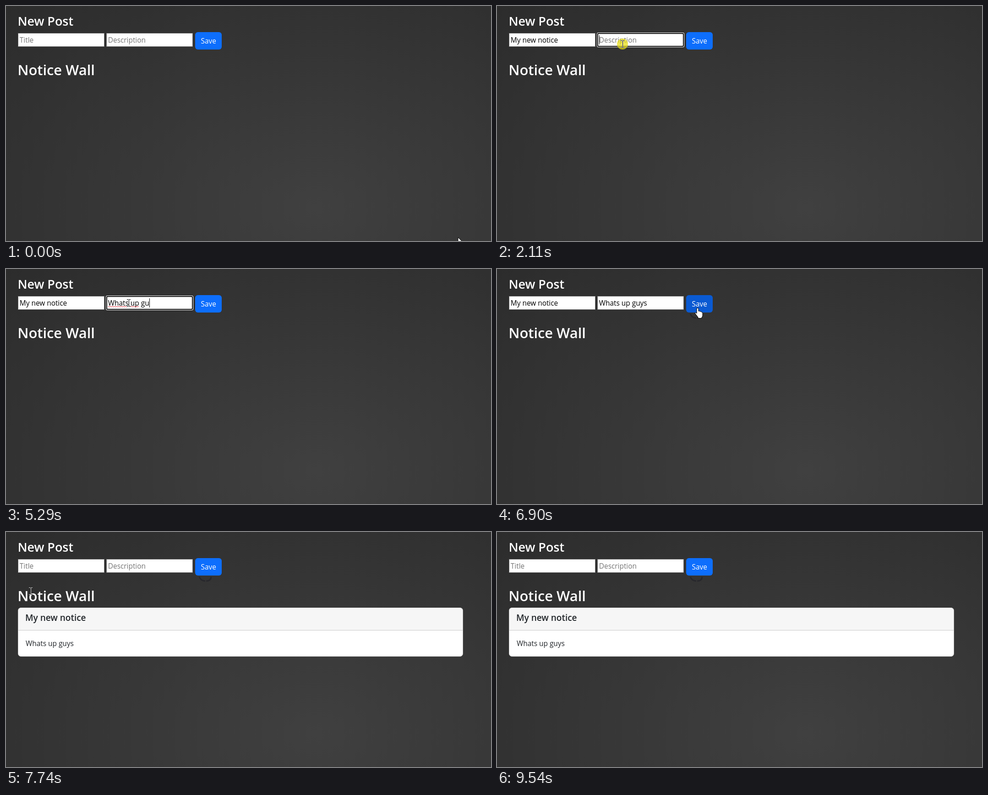
Write an HTML page that moves like this. It is 1059 px wide and 513 px high and loops after 9810 ms.

```html
<!DOCTYPE html>
<html lang="en">
<head>
<meta charset="utf-8">
<title>Notice Wall</title>
<style>
  html, body { margin: 0; width: 100%; height: 100%; overflow: hidden; background: #2d2d2d; }
  svg {
    display: block; width: 1059px; height: 513px;
    background: radial-gradient(ellipse farthest-corner at 675px 440px, #404040, #2c2c2c);
    font-family: "Open Sans", "Noto Sans", sans-serif;
  }
  text { white-space: pre; font-size: 15.4px; }
  .head { font-weight: 600; fill: #fff; }
  .box { fill: #fff; stroke: #767676; }
  .ink { fill: #212529; }
  .wave { fill: none; stroke: #e5202b; }
  #beam { fill: none; stroke: #fff; mix-blend-mode: difference; }
  #arrow, #hand { fill: #fff; stroke: #000; stroke-linejoin: round; }
</style>
</head>
<body>
<svg viewBox="0 0 1059 513">
  <text class="head" x="25.4" y="43" style="font-size:26.9px">New Post</text>
  <g id="title"></g>
  <g id="desc"></g>
  <path id="smudge" d="M422 98q4 9 13 9M437 107q10 0 11-9" fill="none" stroke="#27272c" stroke-width="3"/>
  <rect id="save" x="413" y="57" width="58" height="38" rx="6"/>
  <text x="425.5" y="82" fill="#fff">Save</text>
  <text class="head" x="25.2" y="151" style="font-size:30.9px">Notice Wall</text>
  <g id="card">
    <rect x="26.5" y="165.5" width="971" height="106" rx="6" fill="#fff" stroke="#c9c9c9"/>
    <path d="M27 214v-42q0-6 6-6h958q6 0 6 6v42z" fill="#f6f6f6"/>
    <path d="M27 214.5h970" stroke="#c9c9c9"/>
    <text class="ink" x="42" y="194" style="font-size:19px;font-weight:600">My new notice</text>
    <text class="ink" x="43" y="249">Whats up guys</text>
  </g>
  <circle id="click" r="12" fill="#e6dc14" opacity=".72"/>
  <path id="beam" d="M-4-7.500h3l1 1 1-1h3M.5-7v14M-4 7.500h3l1-1 1 1h3"/>
  <path id="arrow" d="M0 0v16.500l3.800-3.600 2.500 6 2.800-1.200-2.500-5.800h5.200z"/>
  <path id="hand" d="M-2 2q0-2 2-2t2 2v5q3-1 3.500 1 2.500-1 3 1 2.500 0 2.500 2.500v5q0 3-2 4v2h-8v-2l-6-8q-1-2 .5-2.500t2.500 2z"/>
</svg>
<script>
const LOOP = 9810;
const FOCUS_TITLE = 1090, FILLED = 1430, FOCUS_DESC = 2100, BLUR = 6690, SAVED = 6970;
const CLICKS = [FOCUS_TITLE, FOCUS_DESC - 60, BLUR], CLICK_MS = 180;
const TITLE = 'My new notice', DESC = 'Whats up guys';

const $ = id => document.getElementById(id);
const show = (el, on) => el.setAttribute('visibility', on ? 'visible' : 'hidden');
const progress = (t, from, to) => Math.min(1, Math.max(0, (t - from) / (to - from)));
const ease = u => u * u * (3 - 2 * u);

// Each word starts hesitantly, then speeds up
const KEYS = [['Whats ', 3030, 4030], ['up ', 4560, 4890], ['guys', 5020, 5550]].flatMap(
  ([word, from, to]) => [...word].map((_, i) => from + (to - from) * (i / (word.length - 1)) ** .7));

// Glides between resting points: start, end, x, y
const HOME = [987, 505];
const GLIDES = [[70, 960, 114, 79], [FILLED, 2030, 274, 83], [2110, 2370, 268, 74], [6010, 6580, 438, 85]];
const CIRCLE_END = 8020, EXIT = 9000, PEEK = 9330, PEEK_END = 9540;

function circle(t) {
  const a = (t - SAVED) * .0045 - .3;
  return [250 + 196 * Math.cos(a), 132 + 125 * Math.sin(a)];
}

function pointer(t) {
  if (t < SAVED) {
    return GLIDES.reduce((p, [from, to, ...goal]) => {
      const u = ease(progress(t, from, to));
      return p.map((v, i) => v + (goal[i] - v) * u);
    }, HOME);
  }
  if (t < CIRCLE_END) return circle(t);
  if (t < EXIT) {
    const u = progress(t, CIRCLE_END, EXIT), [x, y] = circle(CIRCLE_END);
    return [x + 715 * u, y + 295 * Math.sin(Math.PI * u * u) - 35 * u];
  }
  if (t >= PEEK && t < PEEK_END) {
    const s = Math.sin(Math.PI * (.2 + .8 * progress(t, PEEK, PEEK_END)));
    return [1059 - 14 * s, 513 - 18 * s];
  }
  return null;
}

function makeField(id, x, hint) {
  const left = x + 3.8;
  $(id).innerHTML = `
    <rect class="box" x="${x + .5}" y="59.5" width="188" height="29"/>
    <g class="ring">
      <rect x="${x - 1}" y="58" width="191" height="32" rx="3" fill="#fff"/>
      <rect x="${x}" y="59" width="189" height="30" rx="2" fill="#101010"/>
      <rect x="${x + 2}" y="61" width="185" height="26" rx="1" fill="#fff"/>
    </g>
    <text x="${left}" y="80"></text>
    <path class="wave"/>
    <rect class="caret" y="64" width="1" height="20"/>`;
  const [ring, text, wave, caret] = ['.ring', 'text', '.wave', '.caret'].map(s => $(id).querySelector(s));
  const edge = n => left + (n ? text.getSubStringLength(0, n) : 0);

  function zigzag([from, to]) {
    let d = `M${edge(from)} 83`;
    for (let i = 1; edge(from) + 2 * i <= edge(to); i++) d += `L${edge(from) + 2 * i} ${i % 2 ? 81.5 : 83}`;
    return d;
  }

  return (value, focused, since, t, misspelt = []) => {
    text.textContent = value || hint;
    text.setAttribute('fill', value ? '#000' : '#757575');
    show(ring, focused);
    show(caret, focused && (t - since) % 1060 < 530);
    caret.setAttribute('x', Math.round(edge(value.length)));
    wave.setAttribute('d', misspelt.map(zigzag).join(''));
  };
}

const drawTitle = makeField('title', 26, 'Title');
const drawDesc = makeField('desc', 219, 'Description');
const textAreas = [...document.querySelectorAll('.box, .head, .ink')];

function over(el, [px, py]) {
  const { x, y, width, height } = el.getBBox();
  return px >= x && px < x + width && py >= y && py < y + height;
}

function drawPointer(t, saved) {
  const p = pointer(t);
  let kind = '';
  if (p) {
    const onText = textAreas.some(el => (saved || !el.closest('#card')) && over(el, p));
    kind = over($('save'), p) ? 'hand' : onText ? 'beam' : 'arrow';
    for (const id of [kind, 'click']) $(id).setAttribute('transform', `translate(${p.map(Math.round)})`);
  }
  for (const id of ['arrow', 'beam', 'hand']) show($(id), id === kind);
  show($('click'), CLICKS.some(c => t >= c && t < c + CLICK_MS));
  $('save').setAttribute('fill', kind === 'hand' ? '#0a5ad2' : '#0d6efd');
}

function render(t) {
  const saved = t >= SAVED, filled = t >= FILLED;
  const typed = saved ? 0 : KEYS.filter(k => k <= t).length;
  const onTitle = t >= FOCUS_TITLE && t < FOCUS_DESC;
  const onDesc = t >= FOCUS_DESC && t < BLUR;
  // A word is marked once the space after it is typed
  const misspelt = onDesc ? [[0, 5], [6, 8]].filter(w => typed > w[1]) : [];

  drawTitle(filled && !saved ? TITLE : '', onTitle, filled ? FILLED : FOCUS_TITLE, t);
  drawDesc(DESC.slice(0, typed), onDesc, typed ? KEYS[typed - 1] : FOCUS_DESC, t, misspelt);
  show($('card'), saved);
  show($('smudge'), t >= BLUR);
  drawPointer(t, saved);
}

const start = performance.now();
function tick(now) {
  render(Math.max(0, now - start) % LOOP);
  requestAnimationFrame(tick);
}
tick(start);
</script>
</body>
</html>
```
